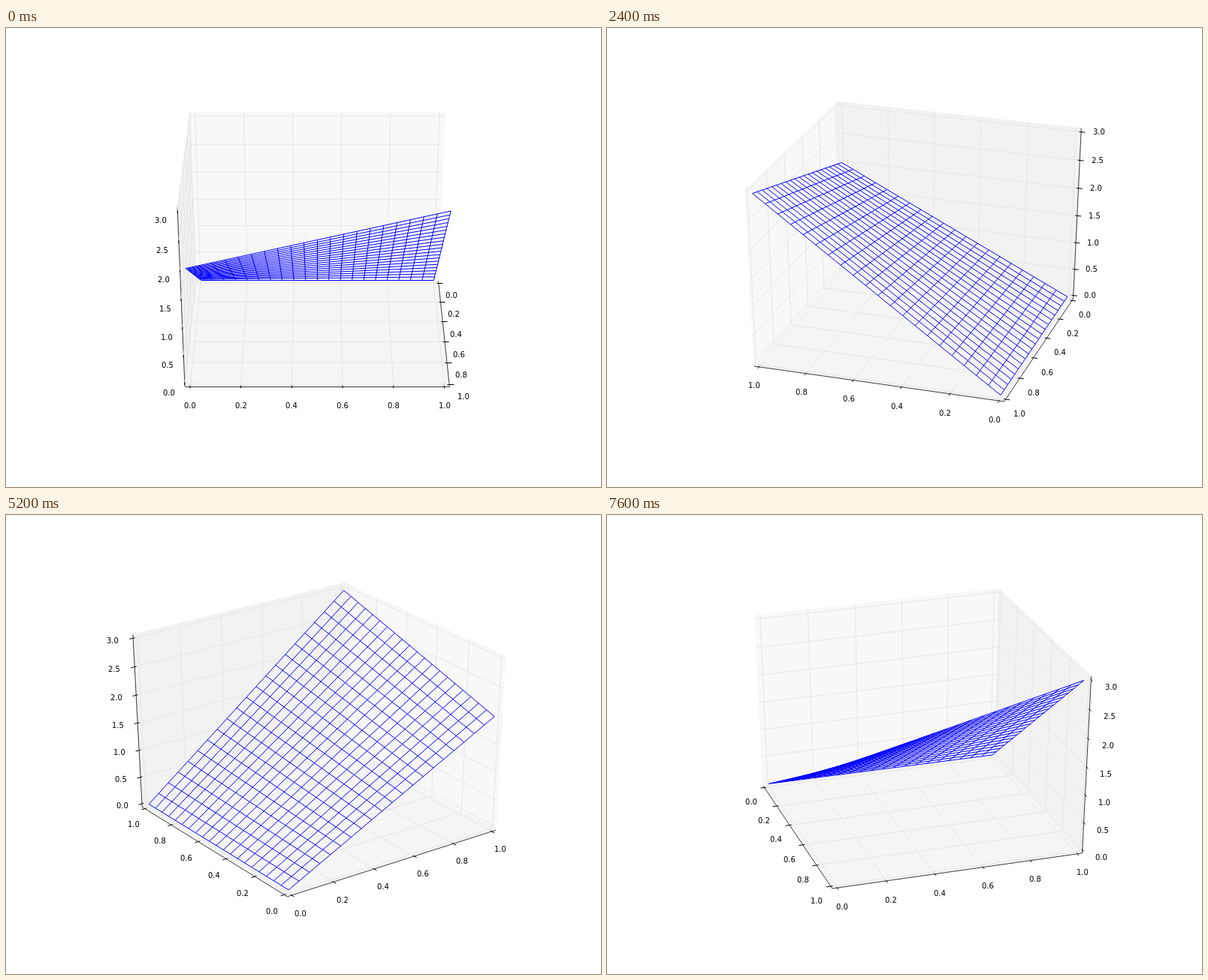
Animation of 792x612 px, one loop 8000 ms. Source, as an HTML page with a canvas:

```html
<!DOCTYPE html>
<html lang="en">
<head>
<meta charset="utf-8">
<title>Rotating wireframe</title>
<style>
  html, body { margin: 0; width: 100%; height: 100%; overflow: hidden; background: #fff; }
  canvas { display: block; }
</style>
</head>
<body>
<canvas id="stage" width="792" height="612"></canvas>
<script>
const ctx = document.getElementById('stage').getContext('2d');

const STEP_MS = 400, STEPS = 20;
const CX = 414.19, CY = 291.94;       // projected centre of the cube
const SX = 3317.84, SY = 2563.78;     // plot scale
const DIST = 10, ELEV = Math.PI / 6;
const EDGE = 0.5 + 1 / 48;            // half size of the padded box
const DELTA = 1 / 12;
const CELLS = 20;

// Coordinates live in a unit cube centred on the origin: x, y, z.
const AXES = [
  { max: 1, step: 0.2, flip: 1, tickDir: 1 },
  { max: 1, step: 0.2, flip: 0, tickDir: 0 },
  { max: 3, step: 0.5, flip: 0, tickDir: 0 }
];
const PANES = ['rgba(242,242,242,.5)', 'rgba(230,230,230,.5)', 'rgba(236,236,236,.5)'];

let view;

function setView(azim) {
  const c = Math.cos(azim), s = Math.sin(azim);
  const ce = Math.cos(ELEV), se = Math.sin(ELEV);
  view = {
    right: [-s, c, 0],
    up: [-se * c, -se * s, ce],
    near: [ce * c, ce * s, se],
    // far side of the box along each axis
    far: [c < -1e-9 ? EDGE : -EDGE, s < -1e-9 ? EDGE : -EDGE, -EDGE]
  };
}

const dot = (a, b) => a[0] * b[0] + a[1] * b[1] + a[2] * b[2];

function project(p) {
  const depth = DIST - dot(view.near, p);
  return [CX + SX * dot(view.right, p) / depth, CY - SY * dot(view.up, p) / depth];
}

function put(p, axis, value) {
  const q = p.slice();
  q[axis] = value;
  return q;
}

const flip = (p, axis) => put(p, axis, -p[axis]);

function trace(points) {
  let px = points.map(project);
  // Axis-aligned paths sit on whole pixels
  const straight = px.every((p, i) => !i ||
    Math.abs(p[0] - px[i - 1][0]) < 1e-4 || Math.abs(p[1] - px[i - 1][1]) < 1e-4);
  if (straight) px = px.map(p => p.map(v => Math.floor(v + 0.5) + 0.5));
  ctx.beginPath();
  px.forEach(p => ctx.lineTo(p[0], p[1]));
}

function line(points, color, width) {
  trace(points);
  ctx.strokeStyle = color;
  ctx.lineWidth = width;
  ctx.stroke();
}

function drawPane(axis) {
  const a = (axis + 1) % 3, b = (axis + 2) % 3, p = view.far;
  trace([p, flip(p, a), flip(flip(p, a), b), flip(p, b)]);
  ctx.closePath();
  ctx.fillStyle = ctx.strokeStyle = PANES[axis];
  ctx.lineWidth = 1;
  ctx.fill();
  ctx.stroke();
}

function drawLabel(text, p) {
  const [x, y] = project(p);
  const w = ctx.measureText(text).width;
  ctx.fillText(text, Math.round(x - w / 2), Math.round(y + 8));
}

function drawAxis(axis) {
  const { max, step, flip: side, tickDir } = AXES[axis];
  const edge = flip(view.far, side);
  const sign = view.far[tickDir] > 0 ? 1 : -1;
  const ticks = [];
  for (let i = 0; i <= Math.round(max / step); i++) {
    ticks.push({ text: (i * step).toFixed(1), at: i * step / max - 0.5 });
  }

  line([edge, flip(edge, axis)], '#000', 0.75);
  for (const { at } of ticks) {
    const p = put(view.far, axis, at);
    line([flip(p, (axis + 1) % 3), p, flip(p, (axis + 2) % 3)], '#e6e6e6', 1);
  }
  ctx.fillStyle = '#000';
  for (const { text, at } of ticks) {
    const p = put(edge, axis, at);
    const end = k => put(p, tickDir, p[tickDir] + k * sign * DELTA);
    line([end(0.1), end(-0.2)], '#000', 1);
    drawLabel(text, p.map((v, i) => i === axis ? v : v + Math.sign(v) * 0.7 * DELTA));
  }
}

function surface(x, y) {
  return [x - 0.5, y - 0.5, x * (2 + 0.97 * y) / 3 - 0.5];
}

function drawSurface() {
  for (let i = 0; i <= CELLS; i++) {
    const t = i / CELLS;
    line([surface(t, 0), surface(t, 1)], '#00f', 1);
    line([surface(0, t), surface(1, t)], '#00f', 1);
  }
}

function draw(step) {
  setView(step / STEPS * 2 * Math.PI);
  ctx.fillStyle = '#fff';
  ctx.fillRect(0, 0, 792, 612);
  ctx.font = '10px "DejaVu Sans", sans-serif';
  [0, 1, 2].forEach(drawPane);
  [0, 1, 2].forEach(drawAxis);
  drawSurface();
}

let shown = -1;
const start = performance.now();

function tick() {
  const step = Math.floor((performance.now() - start) / STEP_MS) % STEPS;
  if (step !== shown) draw(shown = step);
  requestAnimationFrame(tick);
}
tick();
</script>
</body>
</html>
```
